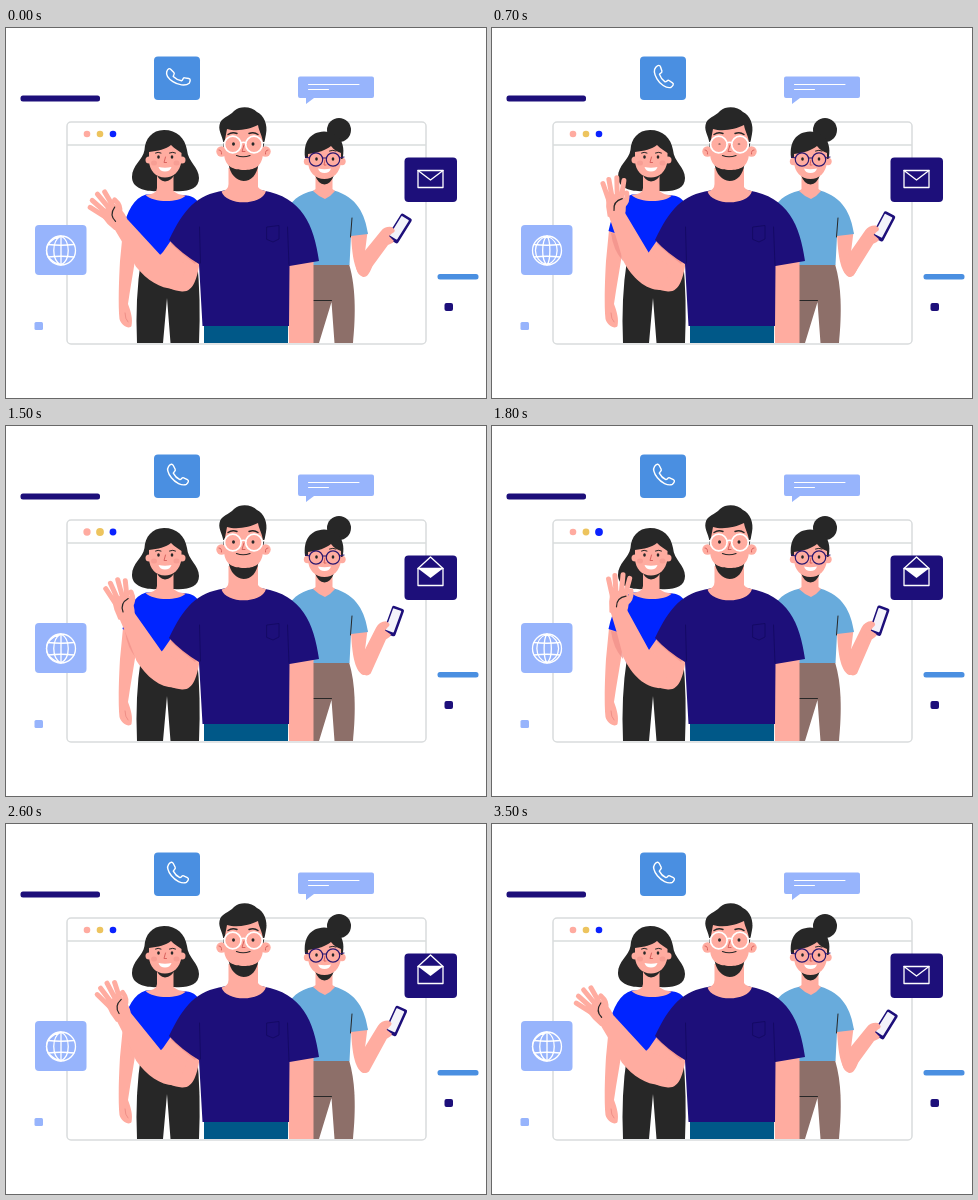
An HTML page that plays this animation: 480 by 370 pixels, repeating every 3.6 s.

```html
<!DOCTYPE html>
<html lang="en">
<head>
<meta charset="utf-8">
<title>Team</title>
<style>
html, body { margin: 0; width: 100%; height: 100%; overflow: hidden; background: #fff; }
svg { display: block; width: 480px; height: 370px; }
.skin { fill: #ffaca0; }
.shade { fill: #ef8f87; }
.dark { fill: #272727; }
.navy { fill: #1d0f7a; }
.sky { fill: #4a8fe1; }
.pale { fill: #97b4fc; }
.line { fill: none; stroke-linecap: round; stroke-linejoin: round; }
.white { stroke: #fff; }
.ink { stroke: #272727; }
.deep { stroke: #140a63; }
.finger { fill: none; stroke: #ffaca0; stroke-width: 5; stroke-linecap: round; }
</style>
</head>
<body>
<svg viewBox="0 0 480 370">
  <!-- browser window -->
  <g fill="#fff" stroke="#d9dcdd" stroke-width="1.5">
    <rect x="61" y="94" width="359" height="222" rx="4"/>
    <path d="M61 117H420"/>
  </g>
  <circle class="dot" cx="81" cy="106" fill="#ffaba0"/>
  <circle class="dot" cx="94" cy="106" fill="#edc45e"/>
  <circle class="dot" cx="107" cy="106" fill="#0a22ff"/>

  <!-- loose shapes -->
  <rect class="navy" x="14.5" y="67.5" width="79.5" height="6" rx="2.5"/>
  <rect class="sky" x="431.5" y="246" width="41" height="5.5" rx="2.5"/>
  <rect class="navy" x="438.5" y="275" width="8.5" height="8" rx="2"/>
  <rect class="pale" x="28.5" y="294" width="8.5" height="8" rx="1.5"/>
  <path class="pale" d="M294 48.500H366Q368 48.500 368 50.500V68Q368 70 366 70H308L300 76V70H294Q292 70 292 68V50.500Q292 48.500 294 48.500Z"/>
  <path class="line white" stroke-width="1" d="M302.500 56.500H353M302.500 61.500H322.500"/>

  <!-- woman on the left -->
  <path class="dark" d="M158 102C146 102 139 111 138.500 122C137 132 126 137 126 149C126 160 139 164 152 163H168C182 164 193 161 193 150C193 139 182 134 181 122C179 110 171 102 158 102Z"/>
  <path class="skin" d="M117 202L132 206C131 225 126 249 122 276C125 284 127 291 125.500 298C123 302 115 297 113.500 291C112 277 113 250 114 233Z"/>
  <path class="shade" d="M119 205L132 207L131 233Q121 222 119 205Z" opacity=".7"/>
  <path class="line" stroke="#ef8f87" d="M119 285Q119 291 122 294"/>
  <path class="dark" d="M135 232H191Q195 270 193 315H164.500L161 270L157 315H131Q129 270 135 232Z"/>
  <path fill="#0024ff" d="M140 166.500C128 170 121 183 116.500 203L132 208L134 237H192V174C189 169 184 168 179 167Z"/>
  <path class="skin" d="M151 148H167.500V163Q172 167 180 167.500C172 175 148 175 139.500 167Q151 166 151 160Z"/>
  <path class="dark" d="M150 145H169Q166 153 159 153.500Q153 153 150 145Z"/>
  <circle class="skin" cx="143" cy="132" r="3.500"/>
  <circle class="skin" cx="176" cy="132" r="3.500"/>
  <path class="skin" d="M143 124C152 123 160 121 165 117C169 121 173 123 175.500 125V133C174 144 167 149.500 159 149.500C150 149.500 143.500 143 143 133Z"/>
  <ellipse class="shade" cx="148" cy="135" rx="3" ry="2.500" opacity=".5"/>
  <ellipse class="shade" cx="170.500" cy="135" rx="3" ry="2.500" opacity=".5"/>
  <path class="line ink" d="M149.500 125Q152 123.500 155 125M163.500 125Q167 123.500 169.500 125"/>
  <g class="dark" data-blink="2100">
    <ellipse cx="152.500" cy="129" rx="1.300"/><ellipse cx="166" cy="129" rx="1.300"/>
  </g>
  <path class="line" stroke="#d9635f" d="M159.500 129L158 134.500H160.500"/>
  <path fill="#fff" d="M152.500 139Q159 140.500 165.500 139Q164 143.500 159 143.500Q154 143.500 152.500 139Z"/>

  <!-- woman on the right -->
  <circle class="dark" cx="333" cy="102" r="12"/>
  <path fill="#8d6f69" d="M290 236H343C351 262 349 295 347 315H328.500L325.500 274L313 315H290Z"/>
  <path class="line ink" d="M305 272.500H325.500"/>
  <path class="skin" d="M345 205L361.500 204L359 224L368 233C364 246 361 249.500 357 249C348 244 346 226 345 205Z"/>
  <g id="forearm">
    <path class="skin" d="M353 230L375 203Q379 198 386 199L392 207Q391 214 382 217L360 247Q353 251 350 240Z"/>
    <g transform="rotate(32 393.500 200.500)">
      <rect class="navy" x="387.200" y="186" width="12.600" height="29" rx="2"/>
      <rect fill="#f3f3fa" x="388.700" y="188.500" width="8.600" height="23" rx=".7"/>
    </g>
    <path class="skin" d="M376 204Q380 198 387 200Q391 203 386 205.500L383 208L388 213Q386 215 379 216Z"/>
  </g>
  <path fill="#68abdc" d="M308 162.500C292 166 284 174 281 184V237H343.500L345 208L362 206C359 186 351 169 328 162.500Z"/>
  <path class="line ink" stroke-width="1" d="M346 190L344.500 209"/>
  <path class="skin" d="M309.500 148H326.500V161L329 163Q325 168 319 171Q312 168 307 163L309.500 161Z"/>
  <path class="dark" d="M309 147H328Q325 156 318.500 156.500Q312 156 309 147Z"/>
  <circle class="skin" cx="301.500" cy="133.500" r="3.700"/>
  <circle class="skin" cx="336" cy="133.500" r="3.700"/>
  <path class="dark" d="M299 130C297 114 304 104 318 103.500C333 104 340 115 336.500 131Z"/>
  <path class="skin" d="M302 126C312 125 320 122 325 118C328 122 332 124 335 125V134C334 145 327 151 318.500 151C309 151 302.500 144 302 134Z"/>
  <path class="line ink" d="M306.500 123Q310 121.500 313 123M323.500 123Q327 121.500 330 123"/>
  <g class="dark" data-blink="1000">
    <ellipse cx="310.500" cy="131" rx="1.300"/><ellipse cx="327" cy="131" rx="1.300"/>
  </g>
  <g class="line" stroke="#2b176f" stroke-width="1.200">
    <circle cx="310" cy="131.500" r="6.700"/><circle cx="327" cy="131.500" r="6.700"/>
    <path d="M316.500 130H320.500M303.500 130L299.500 129M333.500 130L338 129"/>
  </g>
  <path class="line" stroke="#d9635f" d="M319 132L318 137H320"/>
  <path fill="#fff" d="M312 140.500Q318.500 142 325 140.500Q323.500 145 318.500 145Q313.500 145 312 140.500Z"/>

  <!-- man -->
  <path class="skin" d="M166 211L194 233C191 250 188 264 176 263.500C160 262 147 251 142 240L157 224Z"/>
  <g id="arm">
    <path class="skin" d="M116 184L124 208L131 232C140 250 154 262 168 262L182 240L157 225L133 184Z"/>
    <g id="hand">
      <path class="finger" d="M117.500 172L112 155M121 170L118 151M126 170V149.500M130 170L133 152.500M131 178Q137 174 135.500 165"/>
      <path class="skin" d="M115 169Q124 163 133 168Q136 177 133 188Q125 193 116 188Q114 178 115 169Z"/>
      <path class="line ink" stroke-width="1.200" d="M122.500 182Q121.500 173 131 170.500"/>
    </g>
  </g>
  <path class="shade" d="M166 211L194 229L189 236Q176 226 165 216Z" opacity=".7"/>
  <path class="skin" d="M281 235L307.500 233V315H283Z"/>
  <path fill="#005888" d="M198 296H282V315H198Z"/>
  <path class="navy" d="M218 162.500C190 167 178 181 163 212Q176 226 193 236L196.500 298H283L283.500 238L313 233C308 197 296 169 257 162.500Z"/>
  <path class="line deep" stroke-width=".9" d="M193.500 199L194.500 235M281.500 199L283 237M261 199L273 197.500V211L267 214L261 211.500Z"/>
  <path class="skin" d="M222.500 140H252V159Q254 162 260 163C256 178 220 178 215.500 163.500Q222.500 162 222.500 156Z"/>
  <path class="dark" d="M222.500 136H252.500C251 147 245 153 237.500 153C230 152.500 224 146 222.500 136Z"/>
  <circle class="skin" cx="215.500" cy="123.500" r="5.200"/>
  <circle class="skin" cx="259.500" cy="123.500" r="5.200"/>
  <path class="line" stroke="#d9635f" d="M213 122Q216 122 215.500 126M262 122Q259 122 259.500 126"/>
  <path class="dark" d="M217.500 119C218 109 212 104 213.500 97C215 89 223 89 228 83C235 77 246 79 251 84C258 87 262 97 260 106L257.500 119Z"/>
  <path class="skin" d="M218 117L221 101C231 104 244 101 252 97C253 104 257 108 257 117V126C256 139 248 142 238 142C228 142 219 139 218 126Z"/>
  <path class="line ink" stroke-width="1.400" d="M222 106.500Q226 103.500 231 105.500M243 105.500Q248 103.500 252 106.500"/>
  <g class="dark" data-blink="700">
    <ellipse cx="227.500" cy="116" rx="1.500"/><ellipse cx="247" cy="116" rx="1.500"/>
  </g>
  <g class="line white" stroke-width="1.700">
    <circle cx="226.800" cy="116.500" r="8.300"/><circle cx="248" cy="116.500" r="8.300"/>
    <path d="M235 115Q237.500 113.500 240 115M218.500 115L215 114M256.500 115L261 114"/>
  </g>
  <path class="line" stroke="#d9635f" d="M238 117L236 123.500H239"/>
  <path class="line ink" stroke-width="1.200" d="M230.500 127.500Q237 130 244 127.500"/>

  <!-- icon tiles -->
  <rect class="sky" x="148" y="28.500" width="46" height="43.500" rx="4"/>
  <path id="phone" class="line white" stroke-width="1.500" d="M-10-8C-8-11-6-11-5-9L-3-5C-2-3-5-2-5-1C-3 3 0 5 2 6C4 6 4 3 6 4L10 6C12 7 11 9 9 11C4 13-3 9-7 4C-11-1-12-5-10-8Z"/>
  <rect class="pale" x="29" y="197" width="51.500" height="50" rx="4"/>
  <g class="line white" stroke-width="1.300">
    <circle cx="55" cy="222.500" r="14.500"/>
    <path d="M42 216.500Q55 218 68 216.500M42 229Q55 227.500 68 229"/>
    <path id="meridians"/>
  </g>
  <rect class="navy" x="398.500" y="129.500" width="52.500" height="44.500" rx="4"/>
  <g class="line white" stroke-width="1.300">
    <path d="M412 142.500H437V159.500H412Z"/>
    <path id="letter" fill="#fff" stroke="none" d="M412 142.500H437L424.500 152Z"/>
    <path id="flap"/>
  </g>
</svg>
<script>
const $ = id => document.getElementById(id);
const clamp = x => Math.max(0, Math.min(1, x));
const ramp = (t, from, to) => {
  const p = clamp((t - from) / (to - from));
  return p * p * (3 - 2 * p);
};
const wave = (t, period) => (1 - Math.cos(2 * Math.PI * t / period)) / 2;
const turn = (id, angle, x, y) =>
  $(id).setAttribute("transform", `rotate(${angle} ${x} ${y})`);

function meridians(offset) {
  let d = "";
  for (let i = 0; i < 4; i++) {
    const x = 14.5 * ((i + offset) % 4 - 2) / 2;
    d += `M55 208C${55 + x * 1.33} 213 ${55 + x * 1.33} 232 55 237`;
  }
  return d;
}

function draw(t) {
  const lean = 1 - 1.15 * wave(t + 40, 1200) ** 1.25;
  turn("arm", -12.5 * lean, 162, 240);
  turn("hand", -27.5 * lean, 124, 186);
  turn("forearm", -13 * wave(t, 3600), 365, 225);

  const ring = -18 * Math.cos(2 * Math.PI * t / 467) * clamp(1 - t / 1300);
  $("phone").setAttribute("transform", `translate(172 48) rotate(${ring}) scale(.94)`);
  $("meridians").setAttribute("d", meridians(Math.min(t / 500, 4)));

  const open = ramp(t, 1200, 1500) - ramp(t, 2600, 2950);
  $("flap").setAttribute("d", `M412 142.500L424.500 ${152 - 21 * open}L437 142.500`);
  $("letter").setAttribute("opacity", clamp(open * 2 - 1));

  document.querySelectorAll(".dot").forEach((dot, i) =>
    dot.setAttribute("r", 3.3 + 0.7 * clamp(1 - Math.abs(t - 1350 - i * 200) / 300)));
  document.querySelectorAll("[data-blink]").forEach(eyes => {
    const lid = clamp(Math.abs(t - eyes.dataset.blink) / 160);
    for (const eye of eyes.children) eye.setAttribute("ry", 0.4 + 1.4 * lid);
  });
}

// The picture advances ten times a second.
const start = performance.now();
function tick() {
  draw(Math.floor((performance.now() - start) / 100) * 100 % 3600);
  requestAnimationFrame(tick);
}
tick();
</script>
</body>
</html>
```
